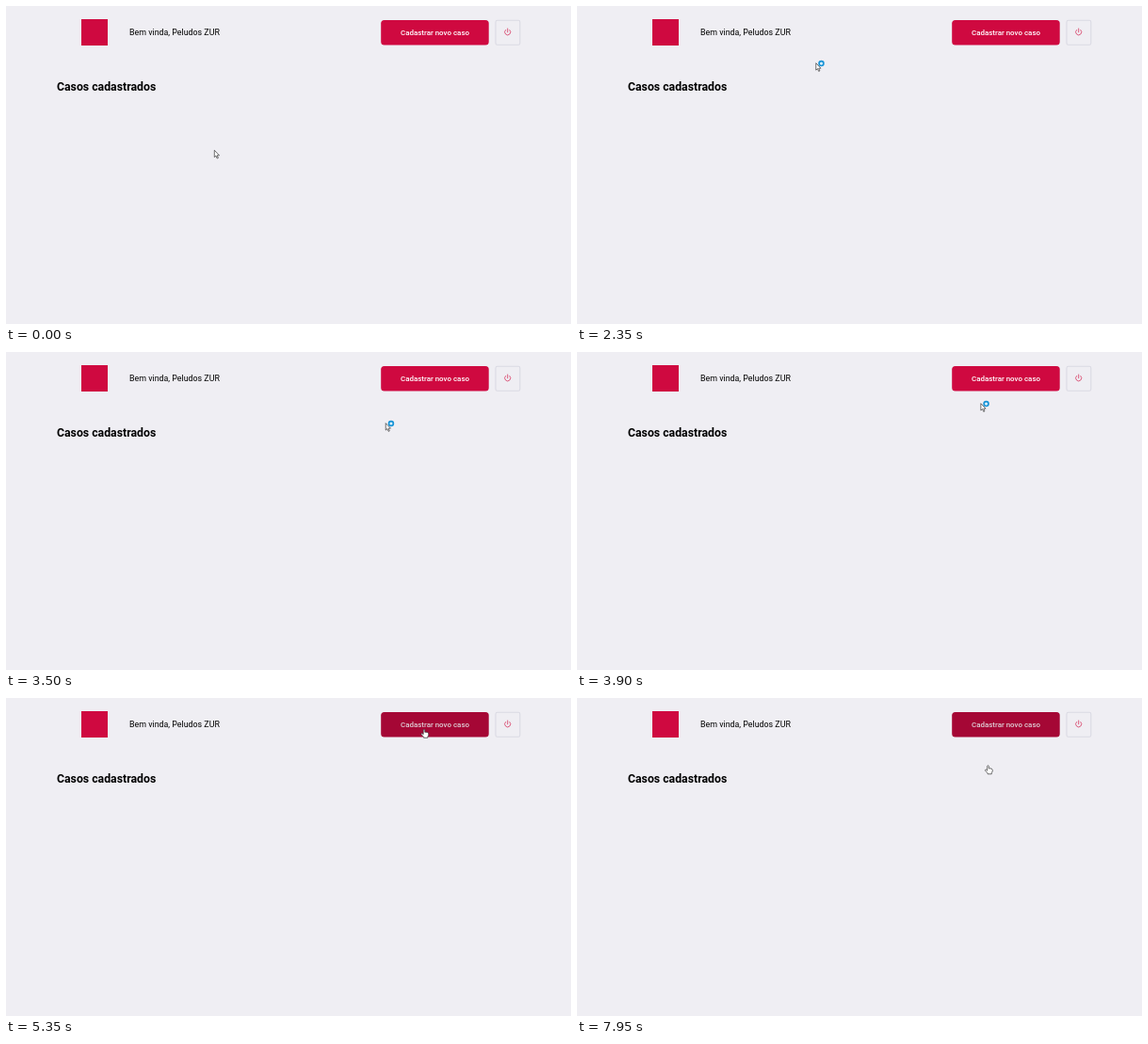
An HTML page for the animation above (8000 ms loop, 600 by 338 pixels).

```html
<!DOCTYPE html>
<html lang="pt-BR">
<head>
<meta charset="utf-8">
<title>Casos cadastrados</title>
<style>
  html, body { margin: 0; width: 100%; height: 100%; overflow: hidden; background: #efeef3; }
  svg { display: block; width: 100%; height: 100%; }
  text { font-family: Roboto, sans-serif; fill: #000; }
</style>
</head>
<body>
<svg viewBox="0 0 600 338">
  <rect x="80" y="14" width="28" height="28" fill="#cf0940"/>
  <text x="131" y="31.4" font-size="8.87">Bem vinda, Peludos ZUR</text>
  <text x="54" y="89.8" font-size="12.27" font-weight="700">Casos cadastrados</text>

  <rect id="button" x="398.2" y="14.9" width="114.5" height="26.5" rx="3.5"/>
  <text id="label" x="455.5" y="30.9" font-size="7.95" font-weight="500" text-anchor="middle">Cadastrar novo caso</text>

  <rect x="520" y="15.2" width="25.8" height="26" rx="1.8" fill="none" stroke="#dadae3" stroke-width="1.1"/>
  <path d="M530.5 25.5a3.1 3.1 0 1 0 4.4 0M532.7 24v3.8" fill="none" stroke="#da4a70" stroke-width=".9" stroke-linecap="round"/>

  <g id="cursor" fill="#fff" stroke="#333" stroke-width=".7" stroke-linejoin="round">
    <g id="arrow">
      <path d="M.3.3v7.4L2 6.2 3.2 9l1.2-.5-1.2-2.7h2.3z"/>
      <circle id="busy" cx="6" cy=".7" r="2.4" fill="#d8effa" stroke="#1793d6" stroke-width="1.7"/>
    </g>
    <path id="hand" d="M-.8 5.7V.8q.8-1.2 1.6 0v2.5q3.7-.4 3.9 1.5v1.7l-.9 1.7v1.1H-.4v-.9L-3 5.7q-.2-1.3 1-1.1z"/>
  </g>
</svg>
<script>
const LOOP = 8000, STEP = 50;
const HOVER_START = 4380, HOVER_FADE = 200;
const BUSY_START = 1800, HAND_START = 4300;

const mix = (a, b, k) => a + (b - a) * k;
const progress = (t, start, end) => Math.min(1, Math.max(0, (t - start) / (end - start)));
const smooth = u => u * u * (3 - 2 * u);
const slowDown = u => 1 - (1 - u) ** 1.95;

// The pointer rests between glides; sag bows a glide downwards.
const home = { x: 221, y: 153 };
const glides = [
  { start: 850, end: 1400, x: 97, y: 25, ease: smooth, sag: 0 },
  { start: 1600, end: 4400, x: 440.5, y: 40.5, ease: slowDown, sag: 51 },
  { start: 4400, end: 4650, x: 444, y: 33, ease: smooth, sag: 0 },
  { start: 7650, end: 7950, x: 436.5, y: 71.5, ease: smooth, sag: 0 }
];

function pointerAt(t) {
  let { x, y } = home;
  for (const glide of glides) {
    const u = progress(t, glide.start, glide.end), k = glide.ease(u);
    x = mix(x, glide.x, k);
    y = mix(y, glide.y, k) + glide.sag * Math.sin(Math.PI * u) ** 2;
  }
  return [x, y];
}

const [button, label, cursor, arrow, busy, hand] =
  ["button", "label", "cursor", "arrow", "busy", "hand"].map(id => document.getElementById(id));
const mixColor = (a, b, k) => `rgb(${a.map((v, i) => Math.round(mix(v, b[i], k)))})`;
const show = (node, on) => node.setAttribute("display", on ? "inline" : "none");

function draw(now) {
  const t = Math.floor(now % LOOP / STEP) * STEP;
  const dark = progress(t, HOVER_START, HOVER_START + HOVER_FADE);
  button.setAttribute("fill", mixColor([207, 9, 64], [165, 7, 53], dark));
  label.style.fill = mixColor([255, 255, 255], [222, 207, 214], dark);

  cursor.setAttribute("transform", `translate(${pointerAt(t)})`);
  show(arrow, t < HAND_START);
  show(busy, t >= BUSY_START);
  show(hand, t >= HAND_START);
  requestAnimationFrame(() => draw(performance.now()));
}
draw(0);
</script>
</body>
</html>
```
